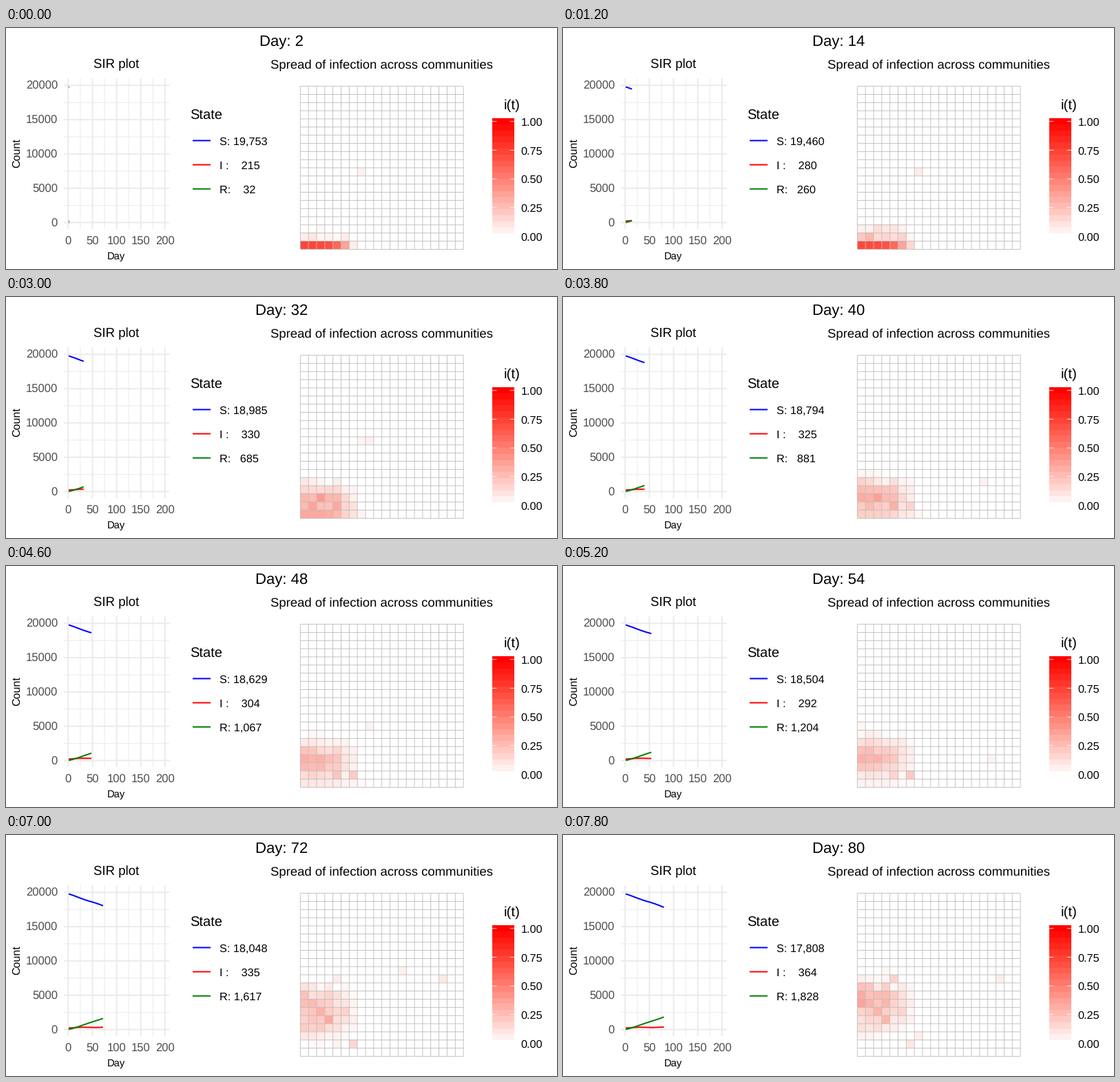
Animation of 800 by 350 pixels, one loop 8000 ms. Source, as a matplotlib script:

```python
import numpy as np
import matplotlib.pyplot as plt
from matplotlib.animation import FuncAnimation

W, H, DPI = 800, 350, 100
FRAMES, STEP = 40, 200
PX = 72 / DPI        # points per pixel
N, PEOPLE = 20, 50   # communities per side, people in each

plt.rcParams["font.family"] = "Liberation Sans"
plt.rcParams["text.hinting"] = "none"

fig = plt.figure(figsize=(W / DPI, H / DPI), dpi=DPI, facecolor="white")
ax = fig.add_axes([0, 0, 1, 1])
ax.axis("off")


def text(x, y, s, size, ha="center", color="black", va="baseline", **kw):
    return ax.text(x, y, s, fontsize=size * PX, ha=ha, va=va, color=color, **kw)


def line(xs, ys, color, width):
    return ax.plot(xs, ys, color=color, lw=width * PX, snap=False,
                   solid_capstyle="butt")[0]


def block(rgb, left, right, bottom, top):
    return ax.imshow(rgb, extent=(left, right, bottom, top), origin="lower",
                     interpolation="nearest", aspect="auto", zorder=1)


# --- epidemic counts -------------------------------------------------------
KEY_DAYS = np.array([1, 2, 14, 24, 40, 54, 72, 80])
KEY_I = np.array([209, 215, 280, 320, 325, 292, 335, 364])
KEY_R = np.array([16, 32, 260, 490, 881, 1204, 1617, 1828])


def smooth(days, keys, vals):
    """Cubic Hermite curve through the key values, in whole people."""
    slope = np.gradient(vals.astype(float), keys)
    k = np.clip(np.searchsorted(keys, days, side="right") - 1, 0, len(keys) - 2)
    h = keys[k + 1] - keys[k]
    u = (days - keys[k]) / h
    y = ((1 + 2 * u) * (1 - u) ** 2 * vals[k] + u * (1 - u) ** 2 * h * slope[k]
         + u * u * (3 - 2 * u) * vals[k + 1] + u * u * (u - 1) * h * slope[k + 1])
    return np.rint(y).astype(int)


DAYS = np.arange(1, 81)
INFECTED = smooth(DAYS, KEY_DAYS, KEY_I)
REMOVED = smooth(DAYS, KEY_DAYS, KEY_R)
SUSCEPTIBLE = N * N * PEOPLE - INFECTED - REMOVED

# --- infection level per community -----------------------------------------
# A wave starts in the bottom row and climbs one row every ten days;
# it weakens beyond the fifth column and gets there later.
rng = np.random.default_rng(4)
ROW, COL = np.mgrid[:N, :N]
first = ROW == 0
LAG = np.maximum(COL - 5, 0)
PEAK = np.where(first, 2 + 12 * LAG,
                17 + 10 * ROW + 4 * LAG + rng.normal(0, 4, (N, N)))
LEVEL = np.where(first, 0.78, 0.3 * rng.uniform(0.6, 1.3, (N, N)))
LEVEL = LEVEL / (1 + np.exp(1.5 * (COL - 5)))
RISE, DECAY = np.where(first, 10, 14), np.where(first, 22, 20)

# outlying outbreaks: column, row, peak day, width, level
SPARKS = [(7, 9, 14, 16, 0.07), (6, 1, 58, 16, 0.2), (17, 9, 74, 9, 0.08)]
SPARKS += [(rng.integers(7, N), rng.integers(0, 11), day, 4, 0.05)
           for day in range(24, 81, 8)]


def bell(day, peak, width):
    return np.exp(-0.5 * ((day - peak) / width) ** 2)


def levels(day):
    grid = LEVEL * bell(day, PEAK, np.where(day < PEAK, RISE, DECAY))
    for col, row, peak, width, top in SPARKS:
        grid[row, col] += top * bell(day, peak, width)
    grid[grid < 0.02] = 0
    return np.clip(grid * INFECTED[day - 1] / PEOPLE / grid.sum(), 0, 1)


def shade(v):
    """White to red, slightly warm in between."""
    return np.stack([np.ones_like(v), 1 - v, (1 - v) ** 1.15], axis=-1)


# --- line chart ------------------------------------------------------------
LEFT, RIGHT, TOP, BOTTOM = 84, 237.5, 73, 292
GREY, TICK = "#EBEBEB", "#4D4D4D"


def px(day):
    return 90.3 + day * 0.7025


def py(count):
    return 282.5 - count * 0.00996


def grid_x(day, width):
    line([px(day)] * 2, [TOP, BOTTOM], GREY, width)


def grid_y(count, width):
    line([LEFT, RIGHT], [py(count)] * 2, GREY, width)


for k in range(4):
    grid_x(25 + 50 * k, 1)
    grid_y(2500 + 5000 * k, 1)
for k in range(5):
    grid_x(50 * k, 2)
    grid_y(5000 * k, 2)
    text(px(50 * k), 315, str(50 * k), 16.6, color=TICK)
    text(75, py(5000 * k) + 6, str(5000 * k), 16.6, ha="right", color=TICK)

text(160.5, 58, "SIR plot", 18.6)
text(160, 336, "Day", 14.8)
text(15.7, 182, "Count", 16, va="center", rotation=90)

SERIES = [("blue", SUSCEPTIBLE, "S:{:7,}"), ("red", INFECTED, "I :{:7,}"),
          ("green", REMOVED, "R:{:6,}")]
text(267.5, 133, "State", 20.2, ha="left")
curves, counts = [], []
for k, (color, _, _) in enumerate(SERIES):
    y = 163.5 + 35.1 * k
    line([271, 297], [y, y], color, 2)
    counts.append(text(309.5, y + 6.2, "", 16.2, ha="left"))
    curves.append(line([], [], color, 2))

# --- community grid --------------------------------------------------------
GX, GY, CELL = 427.3, 84.6, 11.84
GX2, GY2 = GX + N * CELL, GY + N * CELL
heat = block(np.ones((N, N, 3)), GX, GX2, GY2, GY)
for k in range(N + 1):
    line([GX + k * CELL] * 2, [GY, GY2], "#BEBEBE", 0.9)
    line([GX, GX2], [GY + k * CELL] * 2, "#BEBEBE", 0.9)
text(545, 58, "Spread of infection across communities", 18.45)

# --- colour bar ------------------------------------------------------------
BAR_L, BAR_R, NOTCH = 706, 738, 6.4
block(shade(np.linspace(0, 1, 20))[:, None, :], BAR_L, BAR_R, 306.6, 131)
for v in np.linspace(0, 1, 5):
    y = 302.4 - 166.6 * v
    line([BAR_L, BAR_L + NOTCH], [y, y], "white", 0.8)
    line([BAR_R - NOTCH, BAR_R], [y, y], "white", 0.8)
    text(747.5, y + 6, f"{v:.2f}", 16.2, ha="left")
text(735, 118, "i(t)", 20.5)

title = text(399.7, 25, "", 22.2)
ax.set_xlim(0, W)
ax.set_ylim(H, 0)


def draw(frame):
    day = 2 + 2 * frame
    title.set_text(f"Day: {day}")
    for curve, label, (_, data, form) in zip(curves, counts, SERIES):
        curve.set_data(px(DAYS[:day]), py(data[:day]))
        label.set_text(form.format(data[day - 1]))
    heat.set_data(shade(levels(day)))
    return [title, heat, *curves, *counts]


anim = FuncAnimation(fig, draw, frames=FRAMES, interval=STEP, repeat=True,
                     repeat_delay=0, init_func=lambda: draw(0), blit=False)
plt.show()
```
